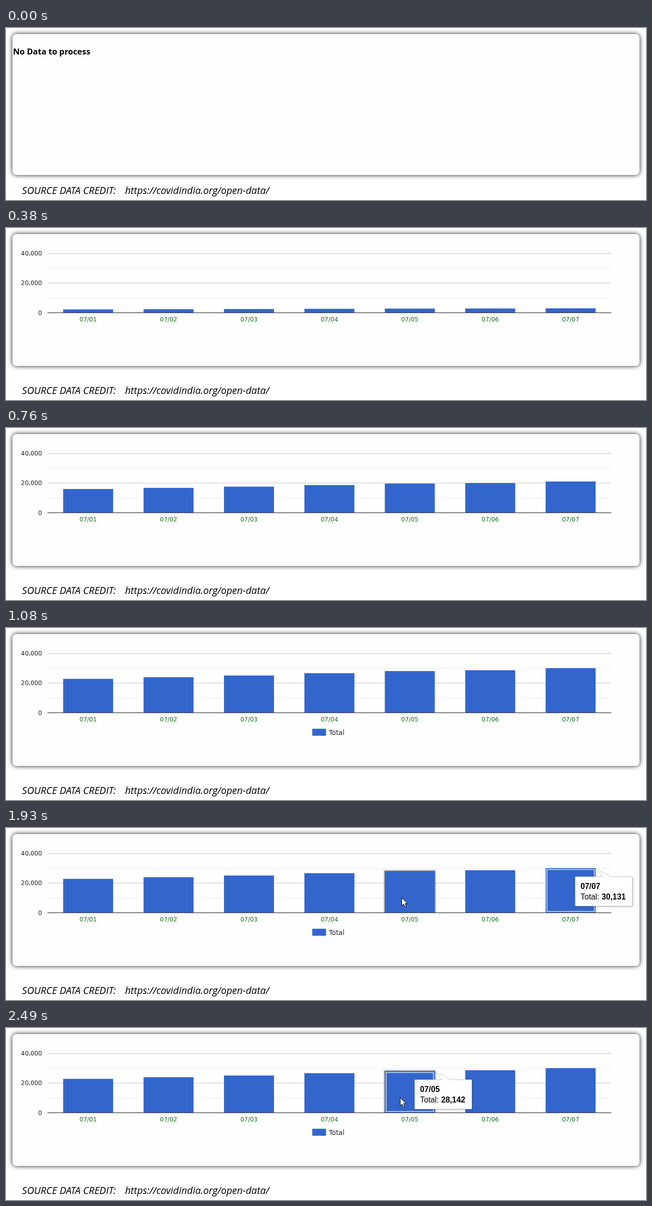
Write an HTML page that moves like this. It is 1280 px wide and 344 px high and loops after 2.9 s.

```html
<!DOCTYPE html>
<html lang="en">
<head>
<meta charset="utf-8">
<title>Daily totals</title>
<style>
  html, body { margin: 0; width: 100%; height: 100%; overflow: hidden; background: #fff; }
  #card {
    position: absolute; left: 13px; top: 11.5px; width: 1254px; height: 282px;
    border-radius: 8px; background: #fefefe; box-shadow: 0 0 10px #1a1a1a;
  }
  #card.small { height: 264.5px; }
  svg { position: absolute; left: 0; top: 0; white-space: pre; }
  .empty { font: bold 16.4px "Open Sans", "Noto Sans", sans-serif; }
  .credit { font: italic 19.7px "Open Sans", sans-serif; }
  .axis { font: 12px "DejaVu Sans", sans-serif; fill: #222; }
  .day { fill: #14701a; text-anchor: middle; }
  .value { text-anchor: end; }
  .legend { font: 13.2px "DejaVu Sans", sans-serif; fill: #222; }
  .tip { font: 15.8px "Liberation Sans", Arial, sans-serif; }
  .tip rect, .tip path { fill: #fff; stroke: #ccc; }
  .tip rect { filter: drop-shadow(1px 1px 1.5px rgba(0, 0, 0, .3)); }
</style>
</head>
<body>
<div id="card"></div>
<svg width="1280" height="344">
  <defs><clipPath id="plot"><path d="M83 40H1211V169.5H83z"/></clipPath></defs>
  <g id="scene"></g>
  <text class="credit" x="32" y="332">SOURCE DATA CREDIT:</text>
  <text class="credit" x="238" y="332">https://covidindia.org/open-data/</text>
</svg>
<script>
const LOOP = 2900, BASE = 169.5, BAR_W = 100, BLUE = '#3366cc';
const totals = [22900, 24000, 25150, 26700, 28142, 28700, 30131];
const steps = [0, 90, 230, 300, 380, 450, 530, 610, 680, 760, 850, 920, 1000, 1080,
  1320, 1390, 1460, 1540, 1610, 1760, 1850, 1930, 2190, 2340, 2490];
// Pointer positions: time, x, y
const pointer = [[1320, 1258, 266], [1390, 1212, 222], [1460, 1152, 162], [1540, 1125, 138],
  [1760, 1000, 139], [1850, 870, 139], [1930, 791, 139], [2190, 788, 139]];

const card = document.getElementById('card');
const scene = document.getElementById('scene');

const text = (cls, x, y, s) => `<text class="${cls}" x="${x}" y="${y}">${s}</text>`;
const rect = (x, y, w, h, attrs) => `<rect x="${x}" y="${y}" width="${w}" height="${h}" ${attrs}/>`;
const gridLine = (y, color, w) => rect(83, y - w / 2, 1127.5, w, `fill="${color}"`);
const barX = i => 114.3 + i * 160.83;
const barTop = (i, grow = 1) => BASE - totals[i] / 40000 * 118.5 * grow;
const day = i => '07/0' + (i + 1);

function glow(i) {
  const outline = [[6, .08], [4, .15], [2, .2]].map(([w, o]) =>
    rect(barX(i), barTop(i), BAR_W, BASE - barTop(i),
      `fill="none" stroke="#000" stroke-width="${w}" stroke-opacity="${o}"`));
  return `<g clip-path="url(#plot)">${outline.join('')}</g>`;
}

function tooltip(i) {
  const x = Math.round(barX(i) + 60) - .5, y = Math.round(barTop(i) + 16.5) + .5;
  return `<g class="tip">${rect(x, y, 114, 58.5, 'rx="1"')}
    <path d="M${x + 56} ${y + .6}L${x + 41} ${y - 16}L${x + 73} ${y + .6}"/>
    <text x="${x + 10.5}" y="${y + 24.5}" font-weight="bold">${day(i)}</text>
    <text x="${x + 10.5}" y="${y + 45}">Total: <tspan font-weight="bold">${totals[i].toLocaleString('en-US')}</tspan></text></g>`;
}

function chart(at, hovered, selected) {
  const grow = Math.min(1, Math.max(0, (at - 317) / 633));
  let out = gridLine(51, '#ccc', 1.2) + gridLine(110.2, '#ccc', 1.2) +
    gridLine(81, '#ebebeb', 1) + gridLine(140, '#ebebeb', 1);
  if (hovered >= 0) out += glow(hovered);
  totals.forEach((_, i) => {
    const y = barTop(i, grow);
    out += rect(barX(i), y, BAR_W, BASE - y, `fill="${BLUE}"`) +
      text('axis day', barX(i) + 50, 187, day(i));
  });
  if (selected >= 0) {
    out += rect(barX(selected) + 2.7, barTop(selected) + 2.9, BAR_W - 5.4,
      BASE - barTop(selected) - 5.4, 'fill="none" stroke="#fff" stroke-width="1.2"');
  }
  out += gridLine(169.5, '#333', 1.2);
  ['40,000', '20,000', '0'].forEach((s, i) => out += text('axis value', 72, 55 + i * 59.4, s));
  if (at >= 1080) out += rect(612.5, 201.5, 27.5, 14, `fill="${BLUE}"`) + text('legend', 646, 214, 'Total');
  if (selected >= 0) out += tooltip(selected);
  return out;
}

function cursor(x, y, pressed) {
  return `<g transform="translate(${x + .5} ${y + .5})">
    <path d="M0 0V16L3.7 12.6L6.4 18.2L9 17L6.4 11.6H11.4Z" fill="#fff" stroke="#000"/>
    ${pressed ? '<circle r="11.7" fill="#ff0" fill-opacity=".47"/>' : ''}</g>`;
}

function draw(at) {
  card.className = at < 90 ? '' : 'small';
  if (at < 90) return text('empty', 14, 53, 'No Data to process');
  if (at < 230) return '';
  const spot = pointer.filter(p => p[0] <= at).pop();
  const hovered = spot ? totals.findIndex((_, i) =>
    spot[1] >= barX(i) && spot[1] <= barX(i) + BAR_W && spot[2] < BASE) : -1;
  const selected = at >= 2490 ? 4 : at >= 1610 ? 6 : -1;
  const pressed = at === 1540 || at === 2340;
  return chart(at, hovered, selected) + (spot ? cursor(spot[1], spot[2], pressed) : '');
}

let shown = -1;
function tick() {
  const t = performance.now() % LOOP;
  const at = steps.filter(s => s <= t).pop();
  if (at !== shown) scene.innerHTML = draw(shown = at);
  requestAnimationFrame(tick);
}
tick();
</script>
</body>
</html>
```
